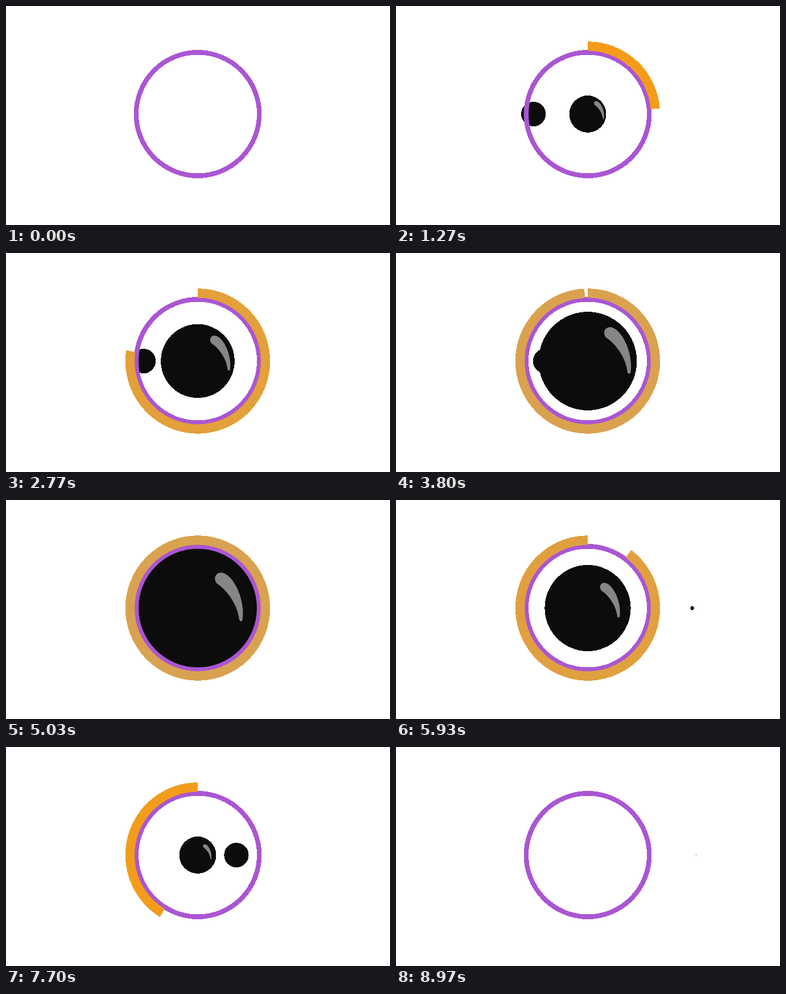
These frames come from a looping animation (675 by 384 pixels, 9.01 s). An HTML page with a canvas:

```html
<!DOCTYPE html>
<html lang="en">
<head>
<meta charset="utf-8">
<title>Eye loader</title>
<style>
  html, body { margin: 0; width: 100%; height: 100%; overflow: hidden; background: #fff; }
  canvas { display: block; }
</style>
</head>
<body>
<canvas id="stage" width="675" height="384"></canvas>
<script>
const ctx = document.getElementById('stage').getContext('2d', { willReadFrequently: true });
const W = 675, H = 384, CX = 337, CY = 189.5, LOOP = 9010;

// All times below are in ticks, 30 per second.
const BEAT = 15, BALLS = 8, FULL = 120, BACK = 150, LAST = 269;
const BALL_R = 21.6, DISC_MAX = 108.3;
const INK = '#0c0c0c', PURPLE = '#aa56d3', GREY = '#868686';
const ORANGE = [244, 156, 26], TAN = [217, 162, 80];

const clamp = v => Math.max(0, Math.min(1, v));
const ease = v => { v = clamp(v); return v * v * (3 - 2 * v); };
const mix = (a, b, k) => a + (b - a) * k;

function bez(s, a, b) {
  const q = 1 - s;
  return 3 * s * q * q * a + 3 * s * s * q * b + s * s * s;
}

const discSize = n => n <= 0 ? 0 : n >= BALLS ? DISC_MAX : BALL_R / 2 * (n + 1);
const glintIn = n => n <= 0 ? 0 : Math.min(1, 0.125 + 0.116 * n);
const glintOut = n => discSize(n) / DISC_MAX;

function dot(x, r) {
  if (r <= 0) return;
  ctx.fillStyle = INK;
  ctx.beginPath();
  ctx.arc(x, 0, r, 0, 2 * Math.PI);
  ctx.fill();
}

function ring(inner, outer, color, from, to) {
  if (to <= from) return;
  const top = -Math.PI / 2;
  ctx.strokeStyle = color;
  ctx.lineWidth = outer - inner;
  ctx.beginPath();
  ctx.arc(0, 0, (inner + outer) / 2, top + from * 2 * Math.PI, top + to * 2 * Math.PI);
  ctx.stroke();
}

function glint(size) {
  if (size <= 0) return;
  ctx.save();
  ctx.scale(size, size);
  ctx.fillStyle = GREY;
  ctx.beginPath();
  ctx.moveTo(31, -53);
  ctx.bezierCurveTo(31, -60, 37, -64, 43, -63.5);
  ctx.bezierCurveTo(65, -60, 86, -13, 80.5, 21);
  ctx.quadraticCurveTo(78, 27, 74.5, 21);
  ctx.bezierCurveTo(72, -9, 48, -36, 35, -43.5);
  ctx.quadraticCurveTo(31, -47, 31, -53);
  ctx.fill();
  ctx.restore();
}

// Edges against the page are hard: each pixel is either solid or clear.
function harden() {
  const img = ctx.getImageData(0, 0, W, H);
  for (let i = 3; i < img.data.length; i += 4) img.data[i] = img.data[i] < 128 ? 0 : 255;
  ctx.putImageData(img, 0, 0);
}

function pose(f) {
  const out = f >= BACK;
  const t = out ? f - BACK : f;
  const beat = Math.floor(t / BEAT);
  const level = out ? BALLS - 1 - beat : Math.min(BALLS, beat);
  const prev = out ? level + 1 : level - 1;
  const since = out ? t - beat * BEAT : t - level * BEAT;
  const k = level > 0 && prev > 0 ? ease(since / 5) : 1;
  const glintSize = out ? glintOut : glintIn;
  return {
    out,
    phase: (t % BEAT) / BEAT,
    moving: out || f < FULL,
    disc: mix(discSize(prev), discSize(level), k),
    shine: mix(glintSize(prev), glintSize(level), k),
    from: out ? bez(clamp((t - 1) / 117.8), 0.044, 0.597) : 0,
    to: out ? 1 : ease(t / FULL),
    tint: clamp(((out ? BALLS - t / BEAT : t / BEAT) - 2.5) / 5.2),
    zoom: 1 + 0.3 * ease(1 - Math.abs(f - 125) / 5)
  };
}

function draw(f) {
  const p = pose(f);
  ctx.setTransform(1, 0, 0, 1, 0, 0);
  ctx.clearRect(0, 0, W, H);
  ctx.translate(CX, CY);
  ctx.scale(p.zoom, p.zoom);

  if (p.moving) {
    const go = ease(p.phase);
    if (p.out) dot(193 * go, BALL_R * (1 - ease((p.phase - 0.45) / 0.55)));
    else dot(-212 * (1 - go), BALL_R * ease(p.phase * 2));
  }
  dot(0, p.disc);
  glint(p.shine);

  const color = ORANGE.map((c, i) => Math.round(mix(c, TAN[i], p.tint)));
  ring(104, 112.4, PURPLE, 0, 1);
  ring(110.9, 127.2, `rgb(${color})`, p.from, p.to);
  harden();
}

function tick() {
  const ms = performance.now() % LOOP;
  draw(Math.min(LAST, Math.floor((ms + 4) * 0.03)));
  requestAnimationFrame(tick);
}
tick();
</script>
</body>
</html>
```
